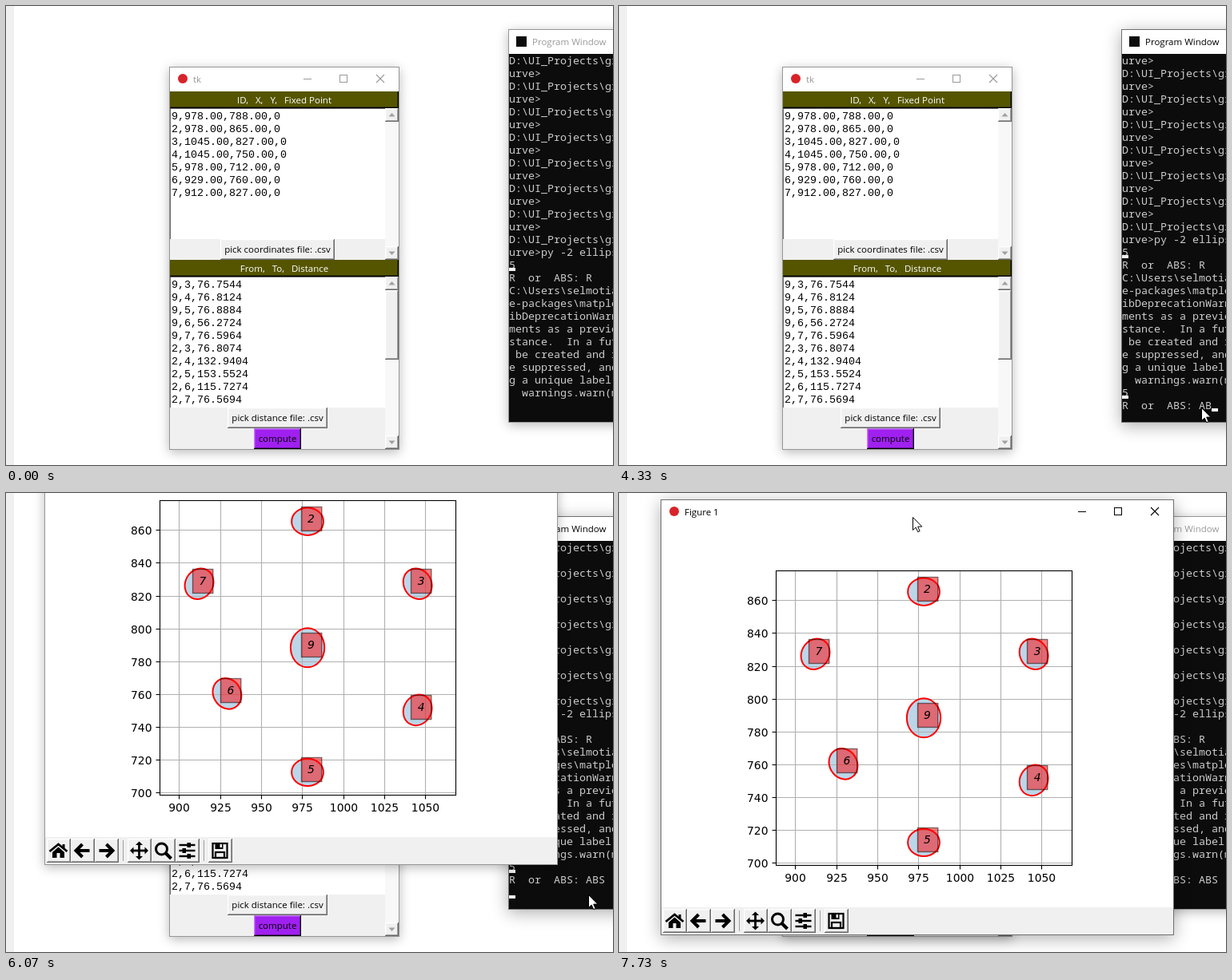
These frames come from a looping animation (759 by 575 pixels, 8000 ms). An HTML page with a canvas:

```html
<!DOCTYPE html>
<html lang="en">
<head>
<meta charset="utf-8">
<title>Error ellipses</title>
<style>
html, body { margin: 0; width: 100%; height: 100%; overflow: hidden; background: #fff; }
canvas { display: block; }
</style>
</head>
<body>
<canvas id="stage" width="759" height="575"></canvas>
<script>
const c = document.getElementById('stage').getContext('2d');
const LOOP = 8000, TICK = 1000 / 15;
const UI = '11.5px "Open Sans", "Noto Sans", sans-serif';
const COURIER = '13.333px "Liberation Mono", "Courier New", monospace';
const CONSOLE = '13.333px "Noto Sans Mono", "DejaVu Sans Mono", monospace';
const PLOT = '13.89px "DejaVu Sans", sans-serif';
// bevel colours: outer light, inner light, inner dark, outer dark
const GREY = ['#fff', '#f4f4f4', '#a0a0a0', '#696969'];
const OLIVE = ['#555500', '#555500', '#333300', '#000'];
const PURPLE = ['#c77cf6', '#b040f3', '#601390', '#000'];

const coords = `9,978.00,788.00,0
2,978.00,865.00,0
3,1045.00,827.00,0
4,1045.00,750.00,0
5,978.00,712.00,0
6,929.00,760.00,0
7,912.00,827.00,0`.split('\n');

const distances = `9,3,76.7544
9,4,76.8124
9,5,76.8884
9,6,56.2724
9,7,76.5964
2,3,76.8074
2,4,132.9404
2,5,153.5524
2,6,115.7274
2,7,76.5694`.split('\n');

const log = ('D:\\UI_Projects\\gi\nurve>\n'.repeat(8).trim() + String.raw`py -2 ellips
5
R  or  ABS: R
C:\Users\selmotia
e-packages\matplo
ibDeprecationWarn
ments as a previo
stance.  In a fut
 be created and r
e suppressed, and
g a unique label 
  warnings.warn(m`).split('\n');

// ticks at which things happen
const PRESS = 15, PRINT = 18, FOCUS = 34, ENTER = 78, OPEN = 83, DRAWN = 87, GRAB = 107;
const keyTicks = [55, 65, 70];
const BLINK = 8;

// pointer rests: time, x, y
const rests = [
  [130, 677, 227], [800, 274, 527], [930, 332, 543], [1400, 332, 543],
  [2267, 728, 503], [6067, 728, 503], [6733, 363, -58]
];

function ease(t, from, to) {
  const u = Math.min(1, Math.max(0, (t - from) / (to - from)));
  return u * u * (3 - 2 * u);
}

function dragOffset(t) {
  const s = ease(t, 7150, 7733);
  return [Math.round(6 * Math.sin(Math.PI * s) - 4 * (1 - s)), Math.round(-88 * (1 - s))];
}

function pointerAt(t) {
  let [, x, y] = rests[0];
  for (let i = 1; i < rests.length; i++) {
    const [t1, x1, y1] = rests[i], s = ease(t, rests[i - 1][0], t1);
    x += (x1 - x) * s;
    y += (y1 - y) * s;
  }
  const [dx, dy] = dragOffset(t);
  return [Math.round(x) + dx + 4, Math.round(y) + dy + 88];
}

function box(x, y, w, h, fill) {
  c.fillStyle = fill;
  c.fillRect(x, y, w, h);
}

function frame(x, y, w, h, color, width) {
  c.strokeStyle = color;
  c.lineWidth = width;
  c.strokeRect(x, y, w, h);
}

function text(s, x, y, font, fill, align = 'left') {
  c.font = font;
  c.fillStyle = fill;
  c.textAlign = align;
  c.fillText(s, x, y);
}

function line(color, width, ...pts) {
  c.beginPath();
  pts.forEach(([x, y]) => c.lineTo(x, y));
  c.strokeStyle = color;
  c.lineWidth = width;
  c.stroke();
}

function poly(fill, ...pts) {
  c.beginPath();
  pts.forEach(([x, y]) => c.lineTo(x, y));
  c.closePath();
  c.fillStyle = fill;
  c.fill();
}

function disc(x, y, r, fill) {
  c.beginPath();
  c.arc(x, y, r, 0, 7);
  c.fillStyle = fill;
  c.fill();
}

function bevel(x, y, w, h, fill, [light, soft, shade, dark]) {
  box(x, y, w, h, dark);
  box(x, y, w - 1, h - 1, light);
  box(x + 1, y + 1, w - 2, h - 2, shade);
  box(x + 1, y + 1, w - 3, h - 3, soft);
  box(x + 2, y + 2, w - 4, h - 4, fill);
}

// white window with border; the shadow falls only outside of it
function pane(x, y, w, h, active, alpha = 1) {
  c.save();
  c.globalAlpha = alpha;
  c.save();
  c.beginPath();
  c.rect(-200, -300, 1300, 1200);
  c.rect(x, y, w, h);
  c.clip('evenodd');
  c.shadowColor = active ? 'rgba(0,0,0,.32)' : 'rgba(0,0,0,.28)';
  c.shadowBlur = active ? 20 : 13;
  c.shadowOffsetY = active ? 4 : 3;
  box(x, y, w, h, '#000');
  c.restore();
  box(x + 1, y + 1, w - 2, h - 2, '#fff');
  frame(x + .5, y + .5, w - 1, h - 1, active ? '#707070' : '#969696', 1);
  c.restore();
}

function controls(right, y, color) {
  line(color, 1, [right - 119, y + .5], [right - 109, y + .5]);
  frame(right - 73.5, y - 4.5, 9, 9, color, 1);
  line(color, 1.1, [right - 28, y - 5], [right - 18, y + 5]);
  line(color, 1.1, [right - 28, y + 5], [right - 18, y - 5]);
}

function arrowButton(y, dir) {
  bevel(474, y, 17, 17, '#f0f0f0', GREY);
  const m = y + 8.5;
  poly('#a0a0a0', [478.5, m - 2 * dir], [486.5, m - 2 * dir], [482.5, m + 2.5 * dir]);
}

function field(y, rows) {
  box(205, y, 269, 164, '#696969');
  box(206, y + 1, 268, 163, '#fff');
  rows.forEach((s, i) => text(s, 207, y + 14 + 16 * i, COURIER, '#000'));
}

function header(y, s) {
  bevel(205, y, 286, 21, '#555500', OLIVE);
  text(s, 348, y + 15, UI, '#fff', 'center');
}

function button(x, y, w, s, fill = '#f0f0f0', edge = GREY) {
  bevel(x, y, w, 26, fill, edge);
  text(s, x + w / 2, y + 17, UI, '#000', 'center');
}

function tkWindow(active, pressed) {
  const ink = active ? '#000' : '#999';
  pane(204, 76, 288, 480, active);
  disc(221, 91, 6, '#d8232a');
  text('tk', 234, 96, UI, ink);
  controls(491, 91, ink);
  box(205, 107, 286, 448, '#f0f0f0');
  box(474, 128, 17, 427, '#f8f8f8');
  header(107, 'ID,   X,   Y,   Fixed Point');
  field(128, coords);
  arrowButton(128, -1);
  arrowButton(301, 1);
  button(268, 292, 143, 'pick coordinates file: .csv');
  header(318, 'From,   To,   Distance');
  field(339, distances);
  arrowButton(339, -1);
  bevel(474, 356, 17, 87, '#f0f0f0', GREY);
  arrowButton(538, 1);
  button(277, 503, 125, 'pick distance file: .csv');
  button(310, 529, 59, 'compute', '#a020f0', pressed ? [...PURPLE].reverse() : PURPLE);
}

// the caret blinks steadily; each key press turns it on until the next blink
function caretOn(n) {
  const lastKey = [FOCUS, ...keyTicks, ENTER].filter(k => n >= k).pop();
  const phase = k => Math.floor((k - FOCUS) / BLINK);
  return (phase(n) - phase(lastKey)) % 2 === 0;
}

function consoleWindow(n) {
  const active = n >= FOCUS && n < GRAB;
  const scroll = (n >= PRINT) + (n >= ENTER);
  const typed = keyTicks.filter(k => n >= k).length;
  pane(628, 29, 200, 493, active);
  box(638, 38, 13, 13, '#0c0c0c');
  text('Program Window', 658, 49, UI, active ? '#000' : '#999');
  box(629, 60, 198, 461, '#0c0c0c');
  const rows = n < PRINT ? log : [...log, '5', 'R  or  ABS: ' + 'ABS'.slice(0, typed)];
  rows.slice(scroll).forEach((s, i) => {
    const y = 60 + 16 * i;
    text(s, 629, y + 13, CONSOLE, '#ccc');
    if (s === '5') box(629, y + 12, 8, 4, '#f2f2f2');
  });
  if (active && caretOn(n)) box(n >= ENTER ? 629 : 725 + 8 * typed, 504, 8, 4, '#f2f2f2');
}

const px = v => 220.9 + (v - 900) * 2.0533;
const py = v => 463.4 - (v - 700) * 2.0533;
const snap = v => Math.floor(v) + .5;

const points = coords.map(row => {
  const [id, x, y] = row.split(',').map(Number);
  return { id, x: px(x), y: py(y) };
});

// long axis lies across the line of sight from the hub
function ellipse({ x, y }) {
  const hub = points[0], dx = x - hub.x, dy = y - hub.y;
  const size = dx || dy ? 1 : 1.23;
  c.beginPath();
  c.ellipse(x, y - .9, 17.2 * size, 19.9 * size, Math.atan2(dy, dx), 0, 2 * Math.PI);
}

function plot() {
  c.fillStyle = '#bcd6e9';
  points.forEach(p => { ellipse(p); c.fill(); });
  for (let v = 900; v <= 1050; v += 25) {
    const x = snap(px(v));
    line('#b0b0b0', 1.1, [x, 97], [x, 466]);
    line('#000', 1.1, [x, 466], [x, 471.5]);
    text(v, x, 487, PLOT, '#000', 'center');
  }
  for (let v = 700; v <= 860; v += 20) {
    const y = snap(py(v));
    line('#b0b0b0', 1.1, [196, y], [566, y]);
    line('#000', 1.1, [191.5, y], [196, y]);
    text(v, 186.5, y + 5, PLOT, '#000', 'right');
  }
  c.strokeStyle = '#f00';
  c.lineWidth = 2;
  points.forEach(p => { ellipse(p); c.stroke(); });
  frame(196.5, 97.5, 370, 369, '#000', 1.1);
  points.forEach(({ id, x, y }) => {
    const bx = snap(x - 7.9), by = snap(y - 19.3);
    box(bx, by, 25.3, 30, 'rgba(255,0,0,.5)');
    frame(bx, by, 25.3, 30, 'rgba(0,0,0,.5)', 1.39);
    text(id, x, y, 'italic ' + PLOT, '#000');
  });
}

function homeIcon() {
  line('#000', 2.8, [-11, 1], [0, -8], [11, 1]);
  box(5, -8, 3, 5, '#000');
  poly('#000', [-7.5, 2], [0, -4.5], [7.5, 2], [7.5, 9], [-7.5, 9]);
  box(-2, 3, 4, 6, '#f0f0f0');
}

function arrowIcon(dir) {
  line('#000', 4, [-9 * dir, 0], [8 * dir, 0]);
  line('#000', 4, [0, -8], [8 * dir, 0], [0, 8]);
}

function panIcon() {
  for (let i = 0; i < 4; i++) {
    line('#000', 2.8, [0, 0], [8, 0]);
    poly('#000', [7, -4.5], [11.5, 0], [7, 4.5]);
    c.rotate(Math.PI / 2);
  }
}

function zoomIcon() {
  disc(-2, -2, 8.5, '#000');
  disc(-2, -2, 5.5, '#f0f0f0');
  line('#000', 4, [3, 3], [10, 10]);
}

function slidersIcon() {
  for (let i = -1; i <= 1; i++) {
    line('#000', 2.4, [-10, 7 * i], [10, 7 * i]);
    box(i ? 0 : -6, 7 * i - 3, 4.5, 6, '#000');
  }
}

function saveIcon() {
  frame(-9, -9, 18, 18, '#000', 2.2);
  box(-6, -9, 10, 7, '#000');
  box(0, -8, 2.5, 4, '#f0f0f0');
  frame(-5.5, 2, 11, 7, '#000', 2.2);
}

function toolbar() {
  const groups = [
    [homeIcon, () => arrowIcon(-1), () => arrowIcon(1)],
    [panIcon, zoomIcon, slidersIcon],
    [saveIcon]
  ];
  box(53, 519, 640, 34, '#f0f0f0');
  groups.forEach((icons, g) => {
    const left = 55 + 101 * g;
    if (g) box(left - 6, 523, 1, 26, '#a0a0a0');
    icons.forEach((draw, i) => {
      const x = left + 30 * i;
      bevel(x, 521, 30, 30, '#f0f0f0', GREY);
      c.save();
      c.translate(x + 14.5, 536);
      draw();
      c.restore();
    });
  });
}

function figureWindow(n, t) {
  if (n < OPEN) return;
  const p = Math.min(1, (n - OPEN + 1) / (DRAWN - OPEN));
  const active = n >= GRAB, ink = active ? '#000' : '#999';
  c.save();
  c.translate(...dragOffset(t));
  if (p < 1) {
    // opens by growing and fading in
    const scale = .954 + .046 * p, w = Math.round(642 * scale), h = Math.round(546 * scale);
    pane(Math.round(373 - w / 2), Math.round(281 - h / 2), w, h, false, p * (1.18 - .18 * p));
  } else {
    pane(52, 8, 642, 546, active);
    disc(69, 23, 6, '#d8232a');
    text('Figure 1', 82, 28, UI, ink);
    controls(693, 23, ink);
    if (n >= DRAWN) {
      plot();
      toolbar();
    }
  }
  c.restore();
}

function pointer(t) {
  if (t < 130) return;
  const [x, y] = pointerAt(t);
  c.save();
  c.translate(x + .5, y + .5);
  poly('#fff', [0, 0], [0, 16], [3.7, 12.6], [6.2, 18.2], [8.6, 17.2], [6.2, 11.6], [11.3, 11.6]);
  c.strokeStyle = '#000';
  c.lineWidth = 1;
  c.stroke();
  c.restore();
}

function draw(time) {
  const n = Math.floor((time % LOOP + 4) / TICK), t = n * TICK;
  box(0, 0, 759, 575, '#fff');
  box(0, 0, 10, 575, '#f0f0f0');
  tkWindow(n >= PRESS && n <= FOCUS, n >= PRESS && n < PRINT);
  consoleWindow(n);
  figureWindow(n, t);
  pointer(t);
}

const start = performance.now();
function loop() {
  draw(performance.now() - start);
  requestAnimationFrame(loop);
}
loop();
</script>
</body>
</html>
```
